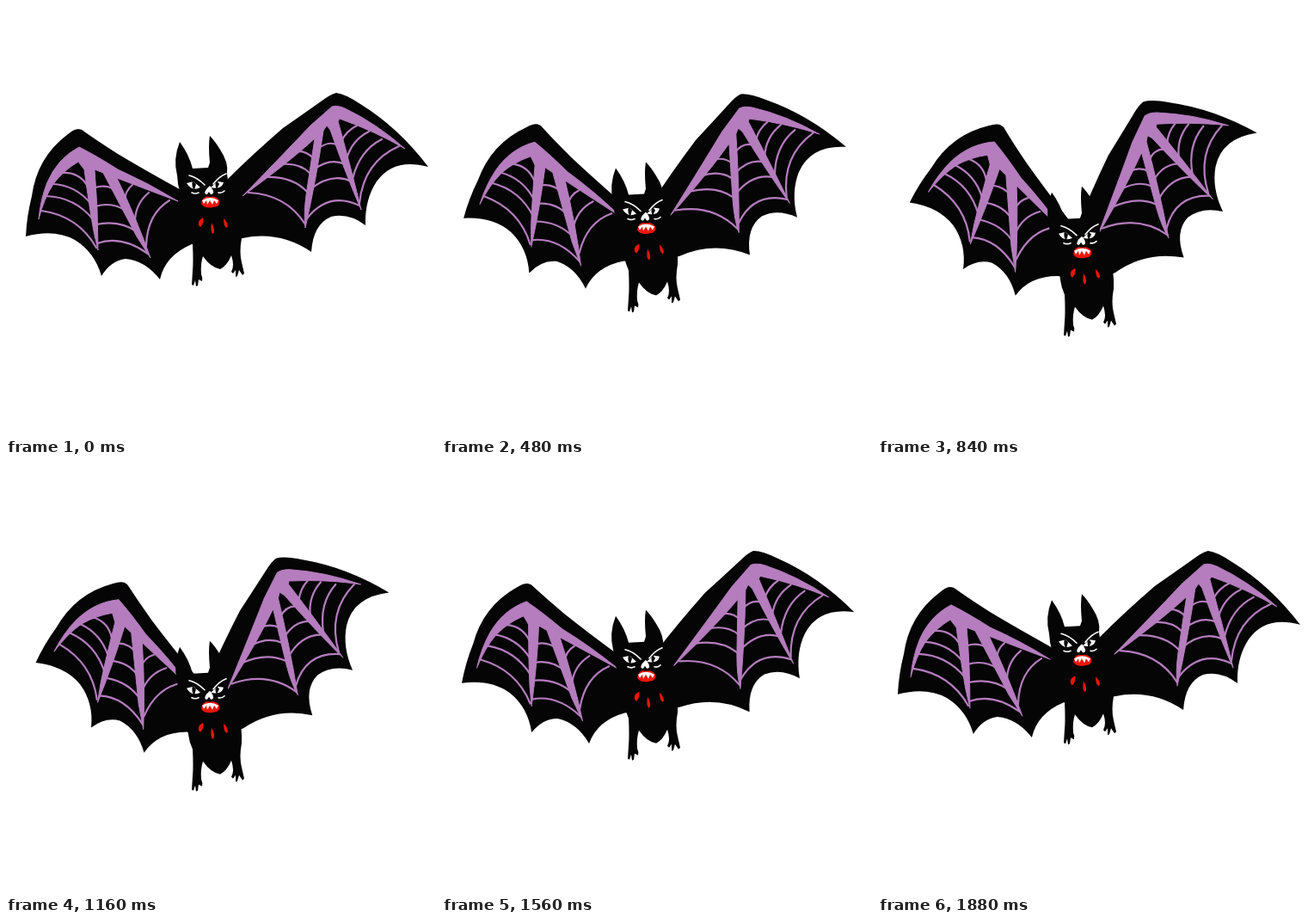
Write an HTML page that moves like this. It is 500 px wide and 500 px high and loops after 1.92 s.

```html
<!DOCTYPE html>
<html lang="en">
<head>
<meta charset="utf-8">
<title>Flying bat</title>
<style>
  html, body { margin: 0; width: 100%; height: 100%; overflow: hidden; background: #fff; }
  svg { display: block; width: 100%; height: 100%; }
  .ink { fill: #050505; }
  .bone { fill: #b57dbe; stroke: #b57dbe; stroke-linejoin: round; }
  .web { fill: none; stroke: #b57dbe; stroke-width: 2.2; stroke-linecap: round; }
  .white { fill: #fff; }
  .line { fill: none; stroke: #fff; stroke-width: 1.6; stroke-linecap: round; }
  .red { fill: #ee1509; }
</style>
</head>
<body>
<svg viewBox="0 0 500 500">
  <g id="bat">
    <g id="left">
      <path class="ink" d="M84 143 Q79 143 72 149 Q36 176 30 221 Q24 245 23 268 Q56 259 80 272 Q103 286 111 314
        Q122 296 139 294 Q162 296 179 318 Q185 290 216 277 L240 275 L240 235 L200 212 Q160 190 130 172 Q105 156 91 146 Q88 143 84 143Z"/>
      <path class="bone" d="M85 164 Q60 177 48 205 Q40 225 38 248 Q44 224 55 207 Q66 192 84 181 L91 190 Q97 235 102 262 L107 284
        Q107 235 103 190 L113 194 Q132 230 152 268 L168 293 Q153 250 129 200 Q160 212 200 227 Q166 206 130 190 Q105 174 85 164Z"/>
      <path class="web" d="M41 238 Q84 244 105 281 M47 221 Q80 222 102 249 M54 207 Q80 208 98 229 M66 194 Q84 193 94 208
        M106 276 Q134 266 165 288 M105 254 Q132 248 153 263 M104 233 Q124 227 141 239 M104 211 Q116 207 128 214
        M163 279 Q164 242 190 226 M150 254 Q149 231 166 217 M138 228 Q138 215 147 208"/>
    </g>
    <g id="right">
      <path class="ink" d="M384 101 Q377 103 369 109 Q345 126 322 142 Q285 174 256 203 L240 240 L240 270 L275 270 Q318 261 355 286
        Q357 254 378 245 Q398 240 418 255 Q417 225 431 204 Q451 176 491 187 Q456 141 412 114 Q394 102 384 101Z"/>
      <path class="bone" d="M379 117 Q385 115 394 119 Q430 136 464 166 Q430 146 388 131 L386 134 Q399 180 413 237
        Q396 198 377 144 L373 139 L369 145 Q361 200 348 258 Q346 242 349 220 Q354 186 359 154 Q330 181 275 221 Q318 177 354 139Z"/>
      <path class="web" d="M282 217 Q326 219 348 254 M302 199 Q333 198 350 216 M320 184 Q342 182 354 195 M337 169 Q350 168 358 178
        M350 247 Q375 215 411 232 M353 214 Q378 193 402 204 M358 190 Q377 176 394 184 M363 166 Q375 156 386 162
        M411 229 Q416 181 457 163 M403 201 Q411 168 437 155 M396 178 Q402 156 422 146 M390 157 Q396 145 408 139"/>
    </g>
    <g class="ink">
      <path d="M202 158 Q194 178 199 197 Q200 220 212 236 Q209 260 217 277 Q218 298 217 308 L216 324 L218 325 L220 319 L221 326 L223 325
        L224 318 L228 320 Q229 316 227 312 Q226 300 229 291 Q238 304 249 306 Q257 302 262 290 Q266 302 262 309 L264 311 L267 307
        L267 315 L269 314 L271 307 L275 313 L277 311 L274 298 Q271 286 274 270 Q276 235 255 222 Q260 211 257 195
        Q259 182 249 167 Q243 157 237 151 Q235 162 237 182 L235 188 L217 189 Q213 173 202 158Z"/>
    </g>
    <path class="white" d="M210 206 L218 204 L226 211 Q216 216 210 206Z M238 211 L246 204 L253 205 Q251 214 238 211Z
      M237 209 L240 213 Q243 219 238 219 L236 216 L234 219 Q229 219 233 213Z"/>
    <path class="ink" d="M217 203 L221 207 L219 214 Q215 210 217 203Z M245 203 L248 207 L245 213 Q242 208 245 203Z"/>
    <path class="line" d="M213 197 Q222 199 231 208 M256 195 Q248 198 241 207 M216 217 Q220 219 224 217 M247 217 Q251 218 254 215"/>
    <path class="red" d="M228 226 Q231 220 237 222 Q244 220 248 226 Q250 233 241 234 Q231 236 227 230Z
      M229 246 Q231 252 226 257 Q222 254 225 249Z M239 252 Q244 261 241 265 Q237 264 239 252Z
      M253 247 Q260 254 257 258 Q253 257 253 247Z"/>
    <path class="white" d="M228 226 Q237 220 247 226 L245 230 L242 226 L240 231 L237 226 L234 231 L233 226 L230 230Z"/>
  </g>
</svg>
<script>
  const LOOP = 1920, STEP = 40, DROP = 61, SWING = 24.5;
  const [bat, left, right] = ["bat", "left", "right"].map(id => document.getElementById(id));
  const start = performance.now();

  function draw() {
    const t = Math.floor((performance.now() - start) / STEP) * STEP % LOOP;
    const p = (1 - Math.cos(2 * Math.PI * t / LOOP)) / 2;
    bat.setAttribute("transform", `translate(0 ${DROP * p})`);
    left.setAttribute("transform", `rotate(${SWING * p} 265 252)`);
    right.setAttribute("transform", `rotate(${-SWING * p} 230.5 258.5)`);
    requestAnimationFrame(draw);
  }
  draw();
</script>
</body>
</html>
```
